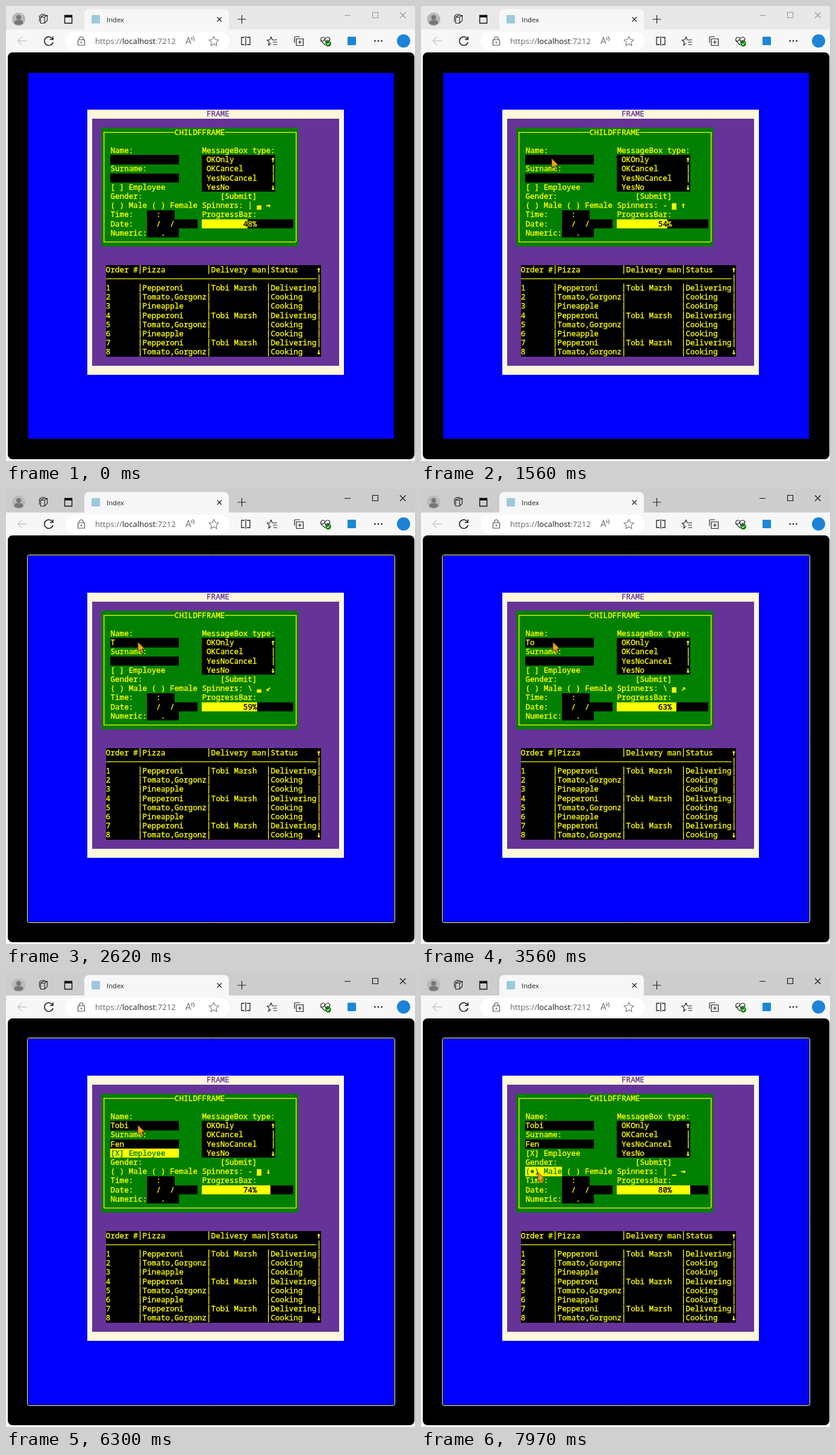
Recreate the animation shown at these times as an HTML page with a canvas. Size 679 by 755 pixels, loop 8 s.

```html
<!DOCTYPE html>
<html>
<head>
<meta charset="utf-8">
<style>
html, body { margin: 0; width: 679px; height: 755px; overflow: hidden; background: #f7f7f7 }
canvas { display: block }
</style>
</head>
<body>
<canvas id="stage" width="679" height="755"></canvas>
<script>
const g = document.getElementById('stage').getContext('2d');
const LOOP = 8000, CW = 7.6, CH = 15.195;
const YELLOW = '#ff0', GREEN = '#008000', PURPLE = '#639', CREAM = '#fff8dc';
const MONO = '12.667px "Noto Sans Mono","DejaVu Sans Mono",monospace';
const ARROW = 'bold 13px "DejaVu Sans Mono",monospace';
const FIRST = 'Tobi', LAST = 'Fen', COURIER = 'Tobi Marsh';
const colX = c => 36.6 + c * CW, rowY = r => 110.73 + r * CH;

// Times at which the progress counter advances by one, starting from 48
const TICKS = [70, 340, 620, 870, 1130, 1380, 1630, 1810, 2090, 2340, 2620, 2810, 3090, 3370, 3560, 3780,
  4100, 4380, 4630, 4840, 5100, 5370, 5560, 5840, 6110, 6300, 6580, 6830, 7080, 7300, 7570, 7760];
const FIRST_KEYS = [2620, 3560, 3780, 3920], LAST_KEYS = [5030, 5250, 5430];
const RING = 2340, SURNAME = 4500, CHECK = 6000, CHECKED = 6300, RADIO = 7500, CHOSEN = 7760, ACTIVE = 1630;
const MOUSE = [[950, 430, 760], [1480, 217, 253], [1690, 217, 253], [1760, 219, 254], [6650, 219, 254], [7500, 194, 332]];

const passed = (times, t) => times.filter(x => x <= t).length;

function rect(x, y, w, h, color) { g.fillStyle = color; g.fillRect(x, y, w, h); }
function round(x, y, w, h, r, color) {
  g.fillStyle = color; g.beginPath(); g.roundRect(x, y, w, h, r); g.fill();
}
function disc(x, y, r, color) { g.fillStyle = color; g.beginPath(); g.arc(x, y, r, 0, 7); g.fill(); }
function path(d, color = '#222', width = 1.2, fill) {
  const p = new Path2D(d);
  if (fill) { g.fillStyle = fill; g.fill(p); }
  g.strokeStyle = color; g.lineWidth = width; g.stroke(p);
}
function text(s, x, y, font, color) { g.font = font; g.fillStyle = color; g.fillText(s, x, y); return g.measureText(s).width; }

// Character-cell helpers
function cells(c, r, w, h, color) {
  const x = Math.round(colX(c)), y = Math.round(rowY(r));
  rect(x, y, Math.round(colX(c + w)) - x, Math.round(rowY(r + h)) - y, color);
}
// A thin outline gives the terminal text its slightly heavier weight
function put(s, c, r, color = YELLOW, font = MONO) {
  const x = colX(c), y = Math.round(rowY(r) + 11.8);
  text(s, x, y, font, color);
  g.strokeStyle = color;
  g.lineWidth = .35;
  g.strokeText(s, x, y);
}
const arrow = (s, c, r) => put(s, c, r, YELLOW, ARROW);
function vline(c, r, h = 1) { rect(Math.floor(colX(c + .5)), rowY(r) + .4, 1.3, h * CH - .8, YELLOW); }
function hline(x1, x2, r) { rect(x1, Math.round(rowY(r) + 7), x2 - x1, 1.2, YELLOW); }
function caret(c, r) { rect(colX(c) + .3, Math.round(rowY(r) + 13.4), 7, 1, YELLOW); }

function browser(t) {
  const active = t >= ACTIVE;
  rect(0, 0, 679, 755, '#f7f7f7');
  rect(0, 0, 679, 39, active ? '#cdcdcd' : '#e8e8e8');
  round(130, 5, 240, 40, 8, '#f7f7f7');
  rect(0, 39, 679, 38, '#f7f7f7');
  round(99, 43, 272, 31, 15.5, '#fff');
  round(3, 77, 675, 675, 8, '#000');

  disc(21, 22, 11, '#b9b9b9');
  disc(21, 19, 4, '#777');
  path('M14 29Q14 24 18 24H24Q28 24 28 29Q21 33 14 29Z', '#777', 1, '#777');
  path('M57.5 18.5L62 15.5H68.5V24L64 28.5H57.5ZM57.5 18.5H64V28.5M64 18.5L68.5 15.5M55.5 26V17L59 14H65', '#222', 1.1);
  path('M97.5 15.5H109.5V28.5H97.5Z', '#111', 1.4);
  rect(97, 15, 13, 4, '#111');
  round(142, 15, 14, 14, 1, '#9cc9dd');
  text('Index', 167, 26.5, '11.3px "Open Sans",sans-serif', '#222');
  path('M350.5 18.5L358 26M358 18.5L350.5 26M391.5 15V29M384.5 22H398.5', '#222');
  path('M562 15.5H572M608.5 10.5H617.5V19.5H608.5ZM654 10.5L663.5 20M663.5 10.5L654 20', active ? '#111' : '#969696', 1.1);

  path('M35 58H20M26 51.5L19.5 58L26 64.5', '#c8c8c8', 1.3);
  path('M77.5 55A7.2 7.2 0 1 0 78 60M78 50.5V55.5H73', '#111', 1.4);
  path('M119.5 56H130.5V65H119.5ZM122 56V54Q122 51 125 51Q128 51 128 54V56', '#555', 1.2);
  disc(125, 60.5, 1.2, '#555');
  let x = 148;
  for (const [part, color] of [['https://', '#666'], ['localhost', '#1b1b1b'], [':7212', '#666']])
    x += text(part, x, 63, '13.2px "Open Sans",sans-serif', color);
  path('M298.5 63L302.7 52L307 63M300 59.5H305.5M307.5 52Q309.5 54 308.5 57M310 50.5Q314 54 311.5 58.5', '#666', 1.1);
  path('M345 50.5l2.4 5.1l5.6 .7l-4.1 3.9l1.1 5.6l-5 -2.8l-5 2.8l1.1 -5.6l-4.1 -3.9l5.6 -.7Z', '#777', 1.1);
  path('M396 52H391V64H396M400 52H405V64H400M398 50V66', '#222', 1.3);
  path('M440 51L442 56L447 56.5M440 51L438 56L433.5 56.5L437 60L436 65L440 62M443 60H450M444 64H450M447 56H450', '#222', 1.2);
  path('M479 61V52Q479 51 480 51H488M482 54.5H493.5V65.5H482ZM487.8 57V63M484.8 60H490.8', '#222', 1.2);
  path('M530 65L523.5 58.5Q521 54 525 52Q528 51 530 54Q532 51 535.5 52Q539 54 537 58M522 58H527L529 55L531 60L533 57H537', '#222', 1.2);
  disc(535, 62.5, 4.8, '#107c10');
  path('M532.8 62.5L534.5 64.2L537.5 60.8', '#fff', 1.1);
  round(567, 51, 14, 14, 1, '#1b87d6');
  for (const dx of [612.5, 618, 623.5]) disc(dx, 58, 1.3, '#111');
  disc(660, 58, 11, '#1c83d8');
}

function desktop(t) {
  rect(37, 111, 607, 607, '#00f');
  if (t >= RING) {
    g.strokeStyle = '#fff';
    g.lineWidth = 1;
    g.beginPath();
    g.roundRect(35.5, 109.5, 610, 610, 3);
    g.stroke();
  }
  cells(13, 4, 56, 29, CREAM);
  put('FRAME', 39, 4, PURPLE);
  cells(14, 5, 54, 27, PURPLE);
}

function form(t) {
  const percent = 48 + passed(TICKS, t);
  cells(16, 6, 43, 13, GREEN);
  const left = Math.floor(colX(16.5)), right = Math.floor(colX(58.5));
  hline(left, colX(32), 6);
  hline(colX(43), right, 6);
  hline(left, right, 18);
  for (const x of [left, right]) rect(x, rowY(6) + 7, 1.3, 12 * CH, YELLOW);
  put('CHILDFFRAME', 32, 6);

  put('Name:', 18, 8);
  put('MessageBox type:', 38, 8);
  cells(18, 9, 15, 1, '#000');
  cells(18, 11, 15, 1, '#000');
  put('Surname:', 18, 10);
  const n1 = passed(FIRST_KEYS, t), n2 = passed(LAST_KEYS, t);
  put(FIRST.slice(0, n1), 18, 9);
  put(LAST.slice(0, n2), 18, 11);
  const blink = percent % 2 === (t < FIRST_KEYS[0] ? 1 : 0);
  if (blink && t < CHECK) t < SURNAME ? caret(18 + n1, 9) : caret(18 + n2, 11);

  const onCheck = t >= CHECK && t < RADIO, onRadio = t >= RADIO;
  if (onCheck) cells(18, 12, 15, 1, YELLOW);
  put(`[${t >= CHECKED ? 'X' : ' '}] Employee`, 18, 12, onCheck ? GREEN : YELLOW);
  put('Gender:', 18, 13);
  if (onRadio) cells(18, 14, 8, 1, YELLOW);
  put('( ) Male', 18, 14, onRadio ? GREEN : YELLOW);
  if (t >= CHOSEN) disc(colX(19.5), rowY(14) + 7.6, 2.7, GREEN);
  put('( ) Female', 27, 14);

  put('Time:', 18, 15);
  put('Date:', 18, 16);
  put('Numeric:', 18, 17);
  cells(26, 15, 6, 1, '#000');
  cells(26, 16, 11, 1, '#000');
  cells(26, 17, 7, 1, '#000');
  put('  :', 26, 15);
  put('  /  /', 26, 16);
  put('   .', 26, 17);

  cells(38, 9, 16, 4, '#000');
  ['OKOnly', 'OKCancel', 'YesNoCancel', 'YesNo'].forEach((s, i) => put(s, 39, 9 + i));
  arrow('↑', 53, 9);
  vline(53, 10);
  vline(53, 11);
  arrow('↓', 53, 12);
  put('[Submit]', 42, 13);

  put('Spinners:', 38, 14);
  put('|/-\\'[percent % 4], 48, 14);
  const phase = percent % 10, eighths = [1, 3, 4, 5, 6, 7][Math.min(phase, 10 - phase)];
  rect(416.5, 338 - eighths * 1.8, 7.5, eighths * 1.8, YELLOW);
  arrow('→↘↓↙←↖↑↗'[percent % 8], 52, 14);

  put('ProgressBar:', 38, 15);
  const filled = Math.ceil(percent / 5);
  cells(38, 16, 20, 1, '#000');
  cells(38, 16, filled, 1, YELLOW);
  [...percent + '%'].forEach((ch, i) => put(ch, 47 + i, 16, 9 + i < filled ? '#000' : YELLOW));
}

function table() {
  const pizzas = ['Pepperoni', 'Tomato,Gorgonz', 'Pineapple'];
  cells(17, 21, 47, 10, '#000');
  const line = (r, ...fields) => {
    fields.forEach((s, i) => put(s, [17, 25, 40, 53][i], r));
    for (const c of [24, 39, 52]) vline(c, r);
  };
  line(21, 'Order #', 'Pizza', 'Delivery man', 'Status');
  hline(colX(17), colX(63), 22);
  for (let i = 0; i < 8; i++) {
    const out = i % 3 === 0;
    line(23 + i, `${i + 1}`, pizzas[i % 3], out ? COURIER : '', out ? 'Delivering' : 'Cooking');
    vline(63, 22 + i);
  }
  arrow('↑', 63, 21);
  arrow('↓', 63, 30);
}

function pointer(t) {
  if (t < MOUSE[0][0]) return;
  let i = MOUSE.findIndex(m => m[0] > t);
  if (i < 0) i = MOUSE.length;
  const a = MOUSE[i - 1], b = MOUSE[i] || a;
  const k = b === a ? 0 : (t - a[0]) / (b[0] - a[0]), e = k * k * (3 - 2 * k);
  g.save();
  g.translate(a[1] + (b[1] - a[1]) * e, a[2] + (b[2] - a[2]) * e);
  path('M0 0V16L3.8 12.6L6.6 19L9.4 17.8L6.6 11.6H11.6Z', '#4a3208', 1, '#eda51a');
  g.restore();
}

function draw() {
  const t = performance.now() % LOOP;
  browser(t);
  desktop(t);
  form(t);
  table();
  pointer(t);
  requestAnimationFrame(draw);
}
draw();
</script>
</body>
</html>
```
